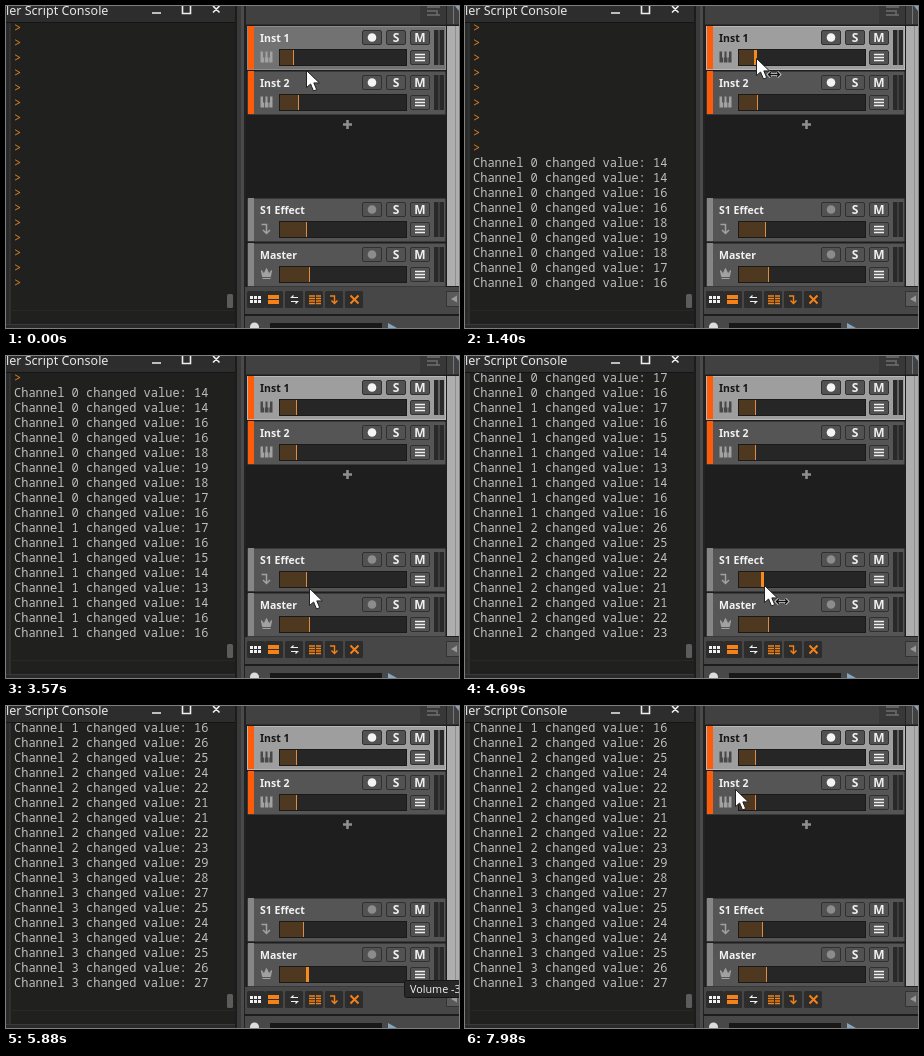
These frames come from a looping animation (453x322 px, 8000 ms). An HTML page:

```html
<!DOCTYPE html>
<html lang="en">
<head>
<meta charset="utf-8">
<title>Script console and mixer faders</title>
<style>
html, body { margin: 0; width: 100%; height: 100%; overflow: hidden; background: #262626; }
svg { display: block; width: 453px; height: 322px; }
text { white-space: pre; }
.log { font: 12px "Noto Sans Mono", monospace; fill: #bebebe; }
.log .prompt { fill: #d88022; }
.title { font: 500 12.5px "Noto Sans", sans-serif; fill: #e8e8e8; }
.name { font: 600 10.5px "Noto Sans", sans-serif; fill: #f2f2f2; }
.key { font: 700 12px "Open Sans", sans-serif; fill: #f0f0f0; text-anchor: middle; }
.tip { font: 500 10.8px "Open Sans", sans-serif; fill: #f4f4f4; }
.back { fill: #555; }
.icon { color: #a2a2a2; }
.hover .back { fill: #727272; stroke: #8c8c8c; }
.selected .back { fill: #9e9e9e; stroke: #b8b8b8; }
.selected .name { fill: #161616; }
.selected .icon { color: #484848; }
</style>
</head>
<body>
<svg id="stage" viewBox="0 0 453 322" xmlns="http://www.w3.org/2000/svg"></svg>
<script>
const LOOP = 8000, STEP = 70, ROWS = 18;
const stage = document.getElementById('stage');

const rect = (x, y, w, h, fill, more = '') =>
  `<rect x="${x}" y="${y}" width="${w}" height="${h}" fill="${fill}" ${more}/>`;
const path = (d, stroke, width = 1.5, fill = 'none') =>
  `<path d="${d}" stroke="${stroke}" stroke-width="${width}" fill="${fill}"/>`;
const text = (x, y, cls, s) => `<text x="${x}" y="${y}" class="${cls}">${s}</text>`;

const icons = {
  piano: path('M0 0H2.5V6H3.6V11H0ZM5 0H7V6H8V11H4.4V6H5ZM9.5 0H12V11H8.8V6H9.5Z', 'none', 0, 'currentColor'),
  send: path('M1 1H6V10M2.5 6.5L6 10L9.5 6.5', 'currentColor'),
  crown: path('M1 2L3.5 5.5L6 0L8.5 5.5L11 2L10 8H2ZM2 10H10', 'currentColor', 1, 'currentColor')
};

const tracks = [
  { name: 'Inst 1', y: 20, icon: 'piano', color: '#ff5c0a', start: 13, db: '-45.8' },
  { name: 'Inst 2', y: 65, icon: 'piano', color: '#ff5c0a', start: 18, db: '-43.5' },
  { name: 'S1 Effect', y: 192, icon: 'send', color: '#868686', start: 26, db: '-35.2' },
  { name: 'Master', y: 237, icon: 'crown', color: '#868686', start: 29, db: '-33.1' }
];

// one drag per track: two bursts of values, the second runs from resume to last
const drags = [
  { press: 700, resume: 1120, last: 1260, release: 1400, bursts: [[14, 14, 16, 16, 18, 19], [18, 17, 16]] },
  { press: 2240, resume: 2730, last: 2800, release: 3080, bursts: [[17, 16, 15, 14, 13], [14, 16, 16]] },
  { press: 4060, resume: 4410, last: 4480, release: 4690, bursts: [[26, 25, 24, 22, 21, 21], [22, 23]] },
  { press: 5390, resume: 5740, last: 5880, release: 6160, bursts: [[29, 28, 27, 25, 24, 24], [25, 26, 27]] }
];

const spread = (vals, from, to) => vals.map((v, k) => {
  const steps = (to - from) / STEP;
  return { v, at: from + STEP * Math.floor(steps * k / (vals.length - 1)) };
});
const messages = drags.flatMap((d, ch) => [
  ...spread(d.bursts[0], d.press, d.press + 3 * STEP),
  ...spread(d.bursts[1], d.resume, d.last)
].map(m => ({ ...m, ch })));

// pointer moves; it rests at the end of each
const outBack = k => 1 + 2.7 * (k - 1) ** 3 + 1.7 * (k - 1) ** 2;
const inOut = k => k * k * (3 - 2 * k);
const moves = [
  { t0: 0, t1: 280, a: [300, 64], b: [288, 50], ease: inOut },
  { t0: 1400, t1: 1890, a: [291, 52], b: [292, 94], ease: outBack },
  { t0: 3080, t1: 3710, a: [291, 95], b: [302, 225], ease: outBack },
  { t0: 4690, t1: 5180, a: [299, 229], b: [303, 270], ease: outBack },
  { t0: 6440, t1: 7350, a: [303, 270], b: [268, 44], ease: inOut, bend: 20 },
  { t0: 7490, t1: 7980, a: [268, 44], b: [270, 83], ease: outBack }
];

function pointerAt(t) {
  const { t0, t1, a, b, ease, bend = 0 } = moves.findLast(m => m.t0 <= t);
  const k = ease(Math.min(1, (t - t0) / (t1 - t0)));
  const [x, y] = a.map((v, i) => v + (b[i] - v) * k);
  return [Math.round(x + bend * Math.sin(2 * Math.PI * k)), Math.round(y)];
}

const button = (x, y, label) =>
  rect(x + .5, y + .5, 19, 14, '#525252', 'rx="1.5" stroke="#303030"') + label;

function trackMarkup(t, i) {
  const y = t.y, dot = i < 2 ? '#f4f4f4' : '#8c8c8c';
  return `<g id="track${i}">` +
    `<rect class="back" x="241.5" y="${y + .5}" width="198" height="43"/>` +
    rect(242, y, 6, 43, t.color) +
    text(254, y + 15.8, 'name', t.name) +
    `<g class="icon" transform="translate(254.5 ${y + 25.5})">${icons[t.icon]}</g>` +
    button(356, y + 4, `<circle cx="366" cy="${y + 11.5}" r="4.3" fill="${dot}"/>`) +
    button(380, y + 4, text(390, y + 16, 'key', 'S')) +
    button(404, y + 4, text(414, y + 16, 'key', 'M')) +
    button(404, y + 24, path(`M409 ${y + 28.5}h10m-10 3h10m-10 3h10`, '#f0f0f0', 1.6)) +
    rect(273.5, y + 23.5, 127, 16, '#262626', 'stroke="#1a1a1a"') +
    rect(274, y + 24, 10, 15, '#4f3820', 'class="fill"') +
    rect(284, y + 24, 1, 15, '#dc8c44', 'class="mark"') +
    rect(428, y + 4, 4.5, 35, '#292929') + rect(433.5, y + 4, 4.5, 35, '#292929') + '</g>';
}

function toolbar() {
  const w = '#f0f0f0', o = '#f58216';
  let s = rect(239, 281, 214, 27, '#474747');
  [241, 259, 279, 299, 319, 339].forEach(x => s += rect(x, 285, 18, 17, '#2d2d2d', 'rx="1.5"'));
  for (let c = 0; c < 3; c++)
    s += rect(244 + c * 4, 290, 3, 3, w) + rect(244 + c * 4, 294, 3, 3, w);
  return s + rect(262, 289, 11, 4, o) + rect(262, 294, 11, 4, o) +
    path('M292 291.5H285.5l2-2M285 295.5H291.5l-2 2', w, 1.2) +
    path('M303 290h6m-6 2.5h6m-6 2.5h6m-6 2.5h6M310 290h5m-5 2.5h5m-5 2.5h5m-5 2.5h5', o, 1.5) +
    path('M324 290H328.5V297.5M325.5 294.5l3 3l3-3', o, 1.4) +
    path('M344.5 289.5l8 8m0-8l-8 8', o, 2) +
    rect(440.5, 285.5, 13, 15, '#5a5a5a', 'stroke="#333"') + path('M445 293l6-3.5v7z', 'none', 0, '#999');
}

function consoleWindow() {
  let s = rect(4, 17, 225, 301, '#20201e') + '<g class="log" id="log">';
  for (let r = 0; r < ROWS; r++) s += text(8, 26 + r * 15, '', '');
  return s + '</g>' + rect(0, 0, 231, 16, '#2d2d2d') + rect(0, 16, 231, 1, '#151515') +
    rect(3.5, 17, 1, 301, '#3c3c3c') + rect(4, 304, 225, 1, '#282828') + rect(0, 318, 231, 1, '#3a3a3a') +
    rect(221, 288, 6, 14, '#5c5c5c', 'rx="1.5"') +
    text(0, 9, 'title', 'ler Script Console') +
    path('M146 7h9M176.5-1v8.5h8V-1M207 0l6.5 6.5m0-6.5l-6.5 6.5', '#eee', 1.6);
}

function mixerWindow() {
  return rect(229, 0, 2, 322, '#1c1c1c') + rect(231, 0, 4, 322, '#3a3a3a') +
    rect(235, 0, 3, 322, '#4a4a4a') + rect(238, 0, 2, 322, '#222') +
    rect(240, 0, 213, 19, '#414141') + rect(414, 0, 26, 18, '#383838') +
    path('M421 1h13m-13 4h9m-9 4h13M431 4v5', '#6e6e6e', 1.5) +
    rect(440, 0, 1, 19, '#222') + rect(447, 0, 1, 18, '#777') + path('M449 0h4v5z', 'none', 0, '#8ba0b4') +
    rect(240, 18.5, 213, 263, '#1e1e1e') +
    rect(441, 20, 12, 260, '#aeaeae') + rect(449, 20, 1, 260, '#8e8e8e') +
    tracks.map(trackMarkup).join('') +
    path('M337 118.5h9m-4.5-4.5v9', '#8e8e8e', 2.6) + toolbar() +
    rect(238, 308, 215, 2, '#1d1d1d') + rect(239, 310, 214, 12, '#484848') +
    '<circle cx="248.5" cy="321" r="4.5" fill="#ddd"/>' +
    rect(264, 317, 112, 5, '#181818') + path('M382 317l9 5h-9z', 'none', 0, '#86a6c0');
}

function overlays() {
  const arrows = 'M12.5 16.5H23.5M15 14L12.5 16.5L15 19M21 14L23.5 16.5L21 19';
  return '<g id="tip">' + rect(398.5, -8.5, 70, 17, '#282828', 'rx="2" stroke="#161616"') +
    text(404, 4, 'tip', '') + '</g><g id="cursor">' +
    path('M.5.5V17.6L4.6 14L7.5 21L10.7 19.6L7.8 12.9H13.4Z', '#222', 1, '#fff') +
    `<g id="resize">${path(arrows, '#ddd', 3)}${path(arrows, '#111', 1.4)}</g></g>`;
}

stage.innerHTML = rect(0, 0, 453, 322, '#2a2a2a') + consoleWindow() + mixerWindow() + overlays();

const $ = q => stage.querySelector(q);
const logRows = [...$('#log').children];
const tip = $('#tip'), tipText = $('#tip text'), cursor = $('#cursor'), resize = $('#resize');
const faders = tracks.map((_, i) => ({ fill: $(`#track${i} .fill`), mark: $(`#track${i} .mark`) }));
const show = (el, on) => el.setAttribute('visibility', on ? 'visible' : 'hidden');
const move = (el, x, y) => el.setAttribute('transform', `translate(${x} ${y})`);

function draw(t) {
  const lines = Array(ROWS).fill('>'), values = tracks.map(k => k.start);
  for (const { at, ch, v } of messages) {
    if (at > t) break;
    values[ch] = v;
    lines.push(`Channel ${ch} changed value: ${v}`);
  }
  lines.slice(-ROWS).forEach((s, r) => {
    logRows[r].textContent = s;
    logRows[r].setAttribute('class', s === '>' ? 'prompt' : '');
  });

  const held = drags.findIndex(d => t >= d.press && t < d.release);
  const dragging = held >= 0;
  const [x, y] = pointerAt(t);
  const over = tracks.findIndex(k => x >= 274 && x <= 400 && y >= k.y + 24 && y < k.y + 39);
  const active = dragging ? held : over;

  faders.forEach(({ fill, mark }, i) => {
    const hot = i === active;
    fill.setAttribute('width', values[i]);
    mark.setAttribute('x', 274 + values[i] - hot);
    mark.setAttribute('width', hot ? 3 : 1);
    mark.setAttribute('fill', hot ? '#f58a1e' : '#dc8c44');
  });
  $('#track0').setAttribute('class', t < drags[0].press ? 'hover' : 'selected');

  show(tip, dragging);
  if (dragging) {
    move(tip, 0, tracks[held].y + 46);
    tipText.textContent = `Volume ${tracks[held].db} dB`;
  }
  show(cursor, !dragging);
  show(resize, !dragging && over >= 0);
  move(cursor, x, y);
}

const begin = performance.now();
function tick() {
  const t = (performance.now() - begin) % LOOP;
  draw(Math.floor(t / STEP) * STEP);
  requestAnimationFrame(tick);
}
tick();
</script>
</body>
</html>
```
